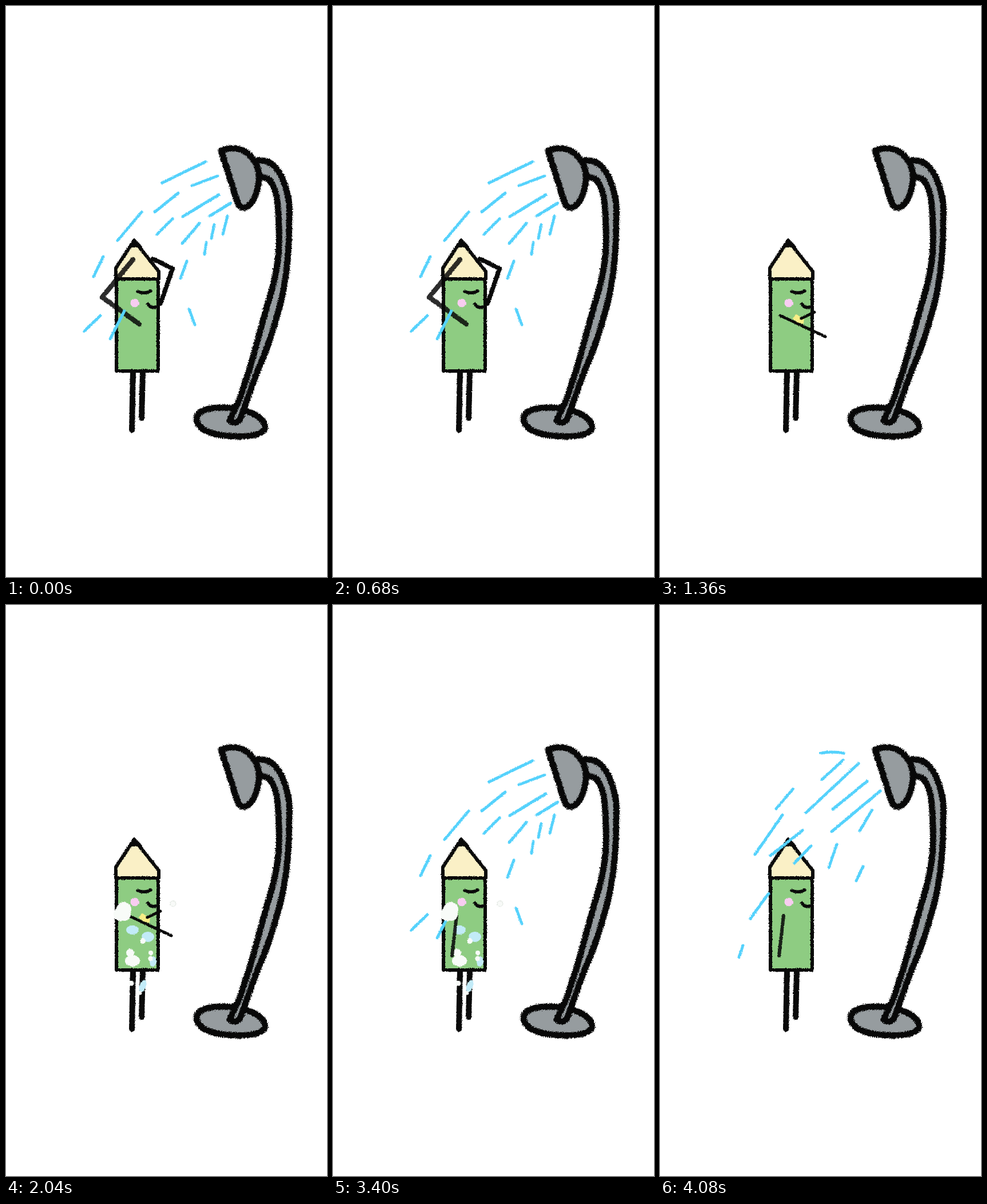
An HTML page that plays this animation: 561x998 px, repeating every 4.92 s.

```html
<!DOCTYPE html>
<html lang="en">
<head>
<meta charset="utf-8">
<title>Pencil in the shower</title>
<style>
  html, body { margin: 0; width: 100%; height: 100%; overflow: hidden; background: #fff; }
  svg { display: block; width: 100%; height: 100%; }
  .ink { fill: none; stroke: #0a0a0a; stroke-linecap: round; stroke-linejoin: round; }
  .metal { fill: #969c9f; stroke: #080808; stroke-width: 11; stroke-linejoin: round; }
  .water { fill: none; stroke: #55d2fc; stroke-width: 5; stroke-linecap: round; }
  .foam { fill: #f8fbf8; }
  .blue { fill: #c2ebf8; }
  .part { visibility: hidden; }
</style>
</head>
<body>
<svg viewBox="0 0 561 998">
  <defs>
    <filter id="rough" filterUnits="userSpaceOnUse" x="0" y="0" width="561" height="998" color-interpolation-filters="sRGB">
      <feTurbulence type="fractalNoise" baseFrequency=".55" numOctaves="2" seed="4" result="grain"/>
      <feDisplacementMap in="SourceGraphic" in2="grain" scale="6" xChannelSelector="R" yChannelSelector="G"/>
    </filter>
    <filter id="fine" filterUnits="userSpaceOnUse" x="0" y="0" width="561" height="998" color-interpolation-filters="sRGB">
      <feTurbulence type="fractalNoise" baseFrequency=".5" numOctaves="2" seed="9" result="grain"/>
      <feDisplacementMap in="SourceGraphic" in2="grain" scale="3" xChannelSelector="R" yChannelSelector="G"/>
    </filter>
  </defs>

  <!-- shower -->
  <g filter="url(#rough)">
    <path class="metal" d="M333 721C334 707 355 701 380 702C420 701 452 718 453 737C449 750 425 753 400 752C362 751 334 742 333 721Z"/>
    <path class="metal" stroke-linecap="round" d="M440 270C466 267 481 290 489 318C496 340 496 355 495 375C495 430 490 480 479 522C468 565 455 603 442 632C430 662 419 697 409 722Q400 733 391 724L406 692C415 668 427 630 435 602C445 565 453 535 461 508C473 470 479 430 477 390C476 350 475 325 462 306Q456 299 441 299"/>
    <path class="metal" d="M376 253C390 247 405 248 415 253C432 262 442 280 442 298C442 322 433 342 424 349C416 355 410 353 406 347Z"/>
  </g>

  <!-- pencil -->
  <g filter="url(#fine)">
    <g class="ink" stroke-width="10" stroke-linecap="butt">
      <path d="M222 638L220 741M239 638L237 720"/>
    </g>
    <g class="ink" stroke-width="6">
      <path fill="#faf0c6" d="M224 410L192 458V477H267V464Z"/>
      <path fill="#8ecc82" d="M193 477H266V638H193Z"/>
      <path fill="#0a0a0a" stroke-width="2" d="M224 407L214 421H237Z"/>
      <path stroke-width="5.5" d="M230 499Q242 504 253 498M248 521Q252 529 264 526"/>
    </g>
    <circle cx="225" cy="519" r="7.5" fill="#f8cdf1"/>
  </g>

  <g class="part" id="wash" filter="url(#fine)">
    <path class="ink" stroke-width="8" d="M257 442L291 459L270 520"/>
    <path class="ink" stroke-width="8.5" stroke-opacity=".86" d="M222 443L168 509L233 556"/>
  </g>

  <g class="part" id="sprayA" filter="url(#fine)">
    <path class="water" d="M273 309L349 272M325 314L370 297M260 360L301 327M309 368L372 330M356 367L392 345M195 410L237 360M264 399L291 372M308 415L338 380M359 406L364 382M379 399L387 367M347 434L350 413M305 476L316 446M153 473L170 438M137 568L165 541M182 582L207 533M320 530L330 557"/>
  </g>
  <g class="part" id="sprayB" filter="url(#fine)">
    <path class="water" d="M281 259Q300 255 321 259M283 305L320 271M203 356L232 322M255 363L347 277M302 357L362 308M300 396L385 325M349 395L370 359M166 436L214 367M193 438L249 394M235 451L264 421M295 459L309 418M343 482L355 457M158 548L190 504M138 616L145 595"/>
  </g>

  <!-- suds -->
  <g class="part" id="suds" filter="url(#fine)">
    <ellipse class="blue" cx="221" cy="568" rx="11" ry="8"/>
    <ellipse class="blue" cx="248" cy="580" rx="11" ry="9"/>
    <circle class="foam" cx="239" cy="587" r="5"/>
  </g>
  <g class="part" id="drips" filter="url(#fine)">
    <ellipse class="blue" cx="257" cy="623" rx="6" ry="9"/>
    <circle class="foam" cx="217" cy="608" r="7"/>
    <ellipse class="foam" cx="221" cy="622" rx="13" ry="10"/>
    <circle class="foam" cx="253" cy="608" r="4"/>
    <circle class="foam" cx="253" cy="618" r="4.5"/>
    <circle class="foam" cx="219" cy="661" r="4.5"/>
    <ellipse class="blue" cx="239" cy="666" rx="5.5" ry="11" transform="rotate(20 239 666)"/>
    <circle class="foam" cx="234" cy="678" r="3.5"/>
  </g>

  <g class="part" id="soap" filter="url(#fine)">
    <path fill="#f7ee86" d="M232 546L238 539L252 547L250 556L240 554Z"/>
    <path class="ink" stroke-width="5" d="M210 541L289 578M247 546L270 535"/>
  </g>
  <g class="part" id="scrub" filter="url(#fine)">
    <path fill="#f7ee86" d="M234 554L240 547L254 555L252 564L242 562Z"/>
    <path class="ink" stroke-width="5" d="M210 541L287 587M249 554L270 541"/>
  </g>
  <g class="part" id="rest" filter="url(#fine)">
    <path class="ink" stroke-width="6" stroke-opacity=".88" d="M216 543L208 613"/>
  </g>

  <g class="part" id="foam" filter="url(#fine)">
    <circle class="foam" cx="206" cy="532" r="13"/>
    <circle class="foam" cx="200" cy="540" r="12"/>
    <circle class="foam" cx="207" cy="541" r="11"/>
    <circle cx="292" cy="522" r="5" fill="#f8faf8" stroke="#dfe5df"/>
  </g>
</svg>
<script>
  const STEP = 340, LOOP = 4920;
  const steps = [
    "wash sprayA", "wash sprayB", "wash sprayA", "wash sprayB",
    "soap", "scrub suds drips",
    "soap suds drips foam", "scrub suds drips foam",
    "soap suds drips foam", "scrub suds drips foam",
    "rest sprayA suds drips foam", "rest sprayB drips",
    "rest sprayB"
  ].map(names => new Set(names.split(" ")));
  const parts = [...document.querySelectorAll(".part")];
  const start = performance.now();
  let shown = -1;

  function draw() {
    const time = (performance.now() - start) % LOOP;
    const index = Math.min(Math.floor(time / STEP), steps.length - 1);
    if (index !== shown) {
      shown = index;
      for (const part of parts)
        part.style.visibility = steps[index].has(part.id) ? "visible" : "hidden";
    }
    requestAnimationFrame(draw);
  }

  draw();
</script>
</body>
</html>
```
